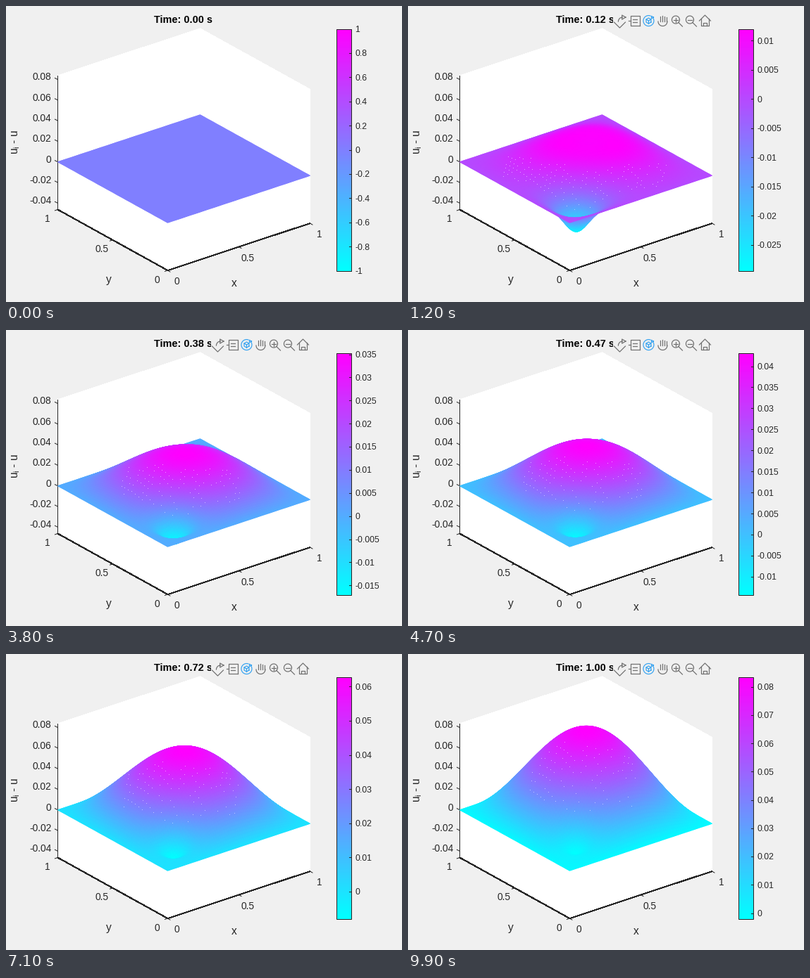
These frames come from a looping animation (562x421 px, 10 s). A matplotlib script:

```python
import numpy as np
import matplotlib.pyplot as plt
from matplotlib.animation import FuncAnimation
from matplotlib.patches import Polygon, Rectangle

W, H, DPI = 562, 421, 100
PX = 72 / DPI
FRAMES = 100
BG, INK, GREY, BLUE = "#f0f0f0", "#262626", "#707070", "#36a3f0"
# Screen position of the origin and screen steps for unit x, y and z.
ORIGIN = np.array([229, 307.7])
EX, EY, EZ = np.array([202, -67]), np.array([-156, -86.5]), np.array([0, -1465])
Z_MIN, Z_MAX = -0.0463, 0.0838
BAR_X, BAR_Y, BAR_W, BAR_H = 469, 32, 21, 344

plt.rcParams["font.family"] = "Liberation Sans"
plt.rcParams["mathtext.default"] = "regular"

fig = plt.figure(figsize=(W / DPI, H / DPI), dpi=DPI, facecolor=BG)
ax = fig.add_axes([0, 0, 1, 1])


def project(x, y, z):
    return [ORIGIN[k] + EX[k] * x + EY[k] * y + EZ[k] * z for k in (0, 1)]


def line(xs, ys, color=INK, width=1.0, z=1, **kw):
    return ax.plot(xs, ys, color=color, lw=width * PX, zorder=z, **kw)[0]


def label(x, y, s, size=13.7, ha="center", **kw):
    """Text whose digits are centred on y."""
    return ax.text(x, y + 0.36 * size, s, fontsize=size * PX, ha=ha,
                   va="baseline", color=INK, **kw)


def gauss(x, y, c, s):
    return np.exp(-((x - c) ** 2 + (y - c) ** 2) / (2 * s * s))


def surface(x, y, t):
    """Growing dome, steady dip near the front and decaying start-up terms."""
    if t == 0:
        return np.zeros_like(x)
    sx, sy = np.sin(np.pi * x), np.sin(np.pi * y)
    dome = (0.098 * t - 0.0145 * t * t) * sx * sy
    tilt = -(0.0015 + 0.008 * np.exp(-6 * t)) * 2 * sx * sy * (
        np.cos(np.pi * x) + np.cos(np.pi * y))
    dip = (0.0275 + 0.01 * np.exp(-20 * t)) * (
        0.6 * gauss(x, y, 0.2, 0.065) + 0.4 * gauss(x, y, 0.2, 0.13))
    dip = dip * np.tanh(12 * x) * np.tanh(12 * y)
    dent = 0.013 * np.exp(-5 * t) * gauss(x, y, 0.66, 0.13) * sx * sy
    return dome + tilt - dip - dent


def draw_box():
    corners = [(0, 1, Z_MIN), (0, 1, Z_MAX), (1, 1, Z_MAX),
               (1, 0, Z_MAX), (1, 0, Z_MIN), (0, 0, Z_MIN)]
    hull = [project(*c) for c in corners]
    ax.add_patch(Polygon(hull, fc="white", ec="none", zorder=0, aa=False))
    for a, b in ((0, 1), (0, 5), (5, 4)):
        line(*zip(hull[a], hull[b]), aa=False)

    for k in range(-2, 5):
        x, y = project(0, 1, 0.02 * k)
        line([x, x - 4], [y, y - 2])
        label(x - 9, y - 4, f"{0.02 * k:.2f}" if k else "0", ha="right")
    for v in (0, 0.5, 1):
        x, y = project(v, 0, Z_MIN)
        line([x, x + 3.5], [y, y + 2])
        label(x + 13, y + 15, f"{v:g}")
        x, y = project(0, v, Z_MIN)
        line([x, x - 4], [y, y + 1.3])
        label(x - 15, y + 12.5, f"{v:g}")

    name = dict(fontsize=15.5 * PX, color=INK, ha="center", va="baseline")
    ax.text(323, 398.5, "x", **name)
    ax.text(145, 393.5, "y", **name)
    ax.text(17, 193, "u$_{i}$ - u", rotation=90, rotation_mode="anchor", **name)


def draw_colorbar():
    ax.imshow(np.linspace(1, 0, 256)[:, None], cmap="cool", aspect="auto",
              extent=(BAR_X, BAR_X + BAR_W, BAR_Y + BAR_H, BAR_Y), zorder=1)
    ax.add_patch(Rectangle((BAR_X, BAR_Y), BAR_W, BAR_H, fc="none", ec=INK,
                           lw=PX, zorder=3))


def draw_toolbar():
    parts = [ax.add_patch(Rectangle((291, 9), 142, 22, fc=BG, ec="none", zorder=6))]
    export, tip, rotate, pan, zoom_in, zoom_out, home = range(301, 422, 20)
    mid = 20.5

    def stroke(xs, ys, color=GREY):
        parts.append(line(xs, ys, color, 1.2, 7))

    def arc(cx, cy, r, start, end, n, color=GREY):
        """n points along an arc; few points give corners, many a curve."""
        a = np.radians(np.linspace(start, end, n))
        stroke(cx + r * np.cos(a), cy + r * np.sin(a), color)

    arc(export - 1, mid + 2, 8, 180, 0, 3)
    arc(export + 3, mid + 1, 6, 180, 270, 8)
    arc(export + 4, mid - 5, 3.5, 0, 360, 4)

    arc(tip + 1, mid, 9.5, 45, 405, 5)
    for dy in (-2, 2):
        stroke([tip - 2, tip + 4], [mid + dy] * 2)
    stroke([tip - 8, tip - 5], [mid] * 2)

    arc(rotate, mid, 7.5, -30, 290, 40, BLUE)
    arc(rotate, mid, 4, 30, 390, 7, BLUE)
    arc(rotate + 5, mid - 5, 2, 0, 360, 4, BLUE)
    for angle in (90, 210, 330):
        arc(rotate, mid, np.array([0, 4]), angle, angle, 2, BLUE)

    for k in range(4):
        stroke([pan - 3 + 3 * k] * 2, [mid - 7 + abs(k - 1), mid + 1])
    arc(pan, mid + 1, 6.5, 0, 180, 12)

    for cx in (zoom_in, zoom_out):
        arc(cx - 1.5, mid - 1.5, 5.5, 0, 360, 30)
        stroke([cx + 2.5, cx + 8], [mid + 2.5, mid + 8])
        stroke([cx - 4.5, cx + 1.5], [mid - 1.5] * 2)
    stroke([zoom_in - 1.5] * 2, [mid - 4.5, mid + 1.5])

    arc(home, mid, 8, 180, 360, 3)
    arc(home, mid + 2, 7.5, 225, -45, 4)
    arc(home, mid + 5, 3, 135, 405, 4)
    return parts


ax.axis("off")
draw_box()
draw_colorbar()
toolbar = draw_toolbar()
title = ax.text(210, 23.5, "", fontsize=14.5 * PX, weight="bold", zorder=5)
# Whole numbers fall just short of pixel centres, so snapping keeps the pixel.
ax.set_xlim(-0.45, W - 0.45)
ax.set_ylim(H - 0.55, -0.55)

# Rows run back to front so nearer cells cover farther ones.
side = np.linspace(1, 0, 76)
X, Y = np.meshgrid(side, side)

# Pinholes on the front slope of the mesh.
grid = np.arange(1, 32) / 32
gx, gy = np.meshgrid(grid, grid)
depth = gx + gy - 0.4 * np.abs(gx - gy)
keep = (depth > 0.48) & (depth < 0.85)
keep &= np.random.default_rng(4).random(gx.shape) < 0.6
gx, gy = gx[keep], gy[keep]

live = []


def draw_ticks(lo, hi):
    span = hi - lo
    step = 0.2 if span > 1 else 0.01 if span > 0.06 else 0.005
    first, last = np.ceil(lo / step - 1e-6), np.floor(hi / step + 1e-6)
    for k in range(int(first), int(last) + 1):
        y = BAR_Y + BAR_H * (hi - k * step) / span
        live.append(line([BAR_X + BAR_W - 3, BAR_X + BAR_W], [y, y], z=3))
        live.append(label(495, y, f"{round(k * step, 4):g}", 12.2, "left"))


def update(i):
    while live:
        live.pop().remove()
    t = i / (FRAMES - 1)
    z = surface(X, Y, t)
    lo, hi = (z.min(), z.max()) if i else (-1, 1)
    live.append(ax.pcolormesh(*project(X, Y, z), z, cmap="cool", vmin=lo, vmax=hi,
                              shading="gouraud", zorder=2))
    if i:
        near = np.abs(gx - gy) < 0.42 + 0.36 * np.exp(-4 * t)
        x, y = gx[near], gy[near]
        dots = project(x, y, surface(x, y, t))
        live.append(ax.plot(*dots, ",", color="white", alpha=0.5, zorder=3)[0])
    draw_ticks(lo, hi)
    title.set_text(f"Time: {t:.2f} s")
    for part in toolbar:
        part.set_visible(i > 0)
    return []


anim = FuncAnimation(fig, update, frames=FRAMES, interval=100, repeat=True,
                     repeat_delay=0, blit=False)
plt.show()
```
